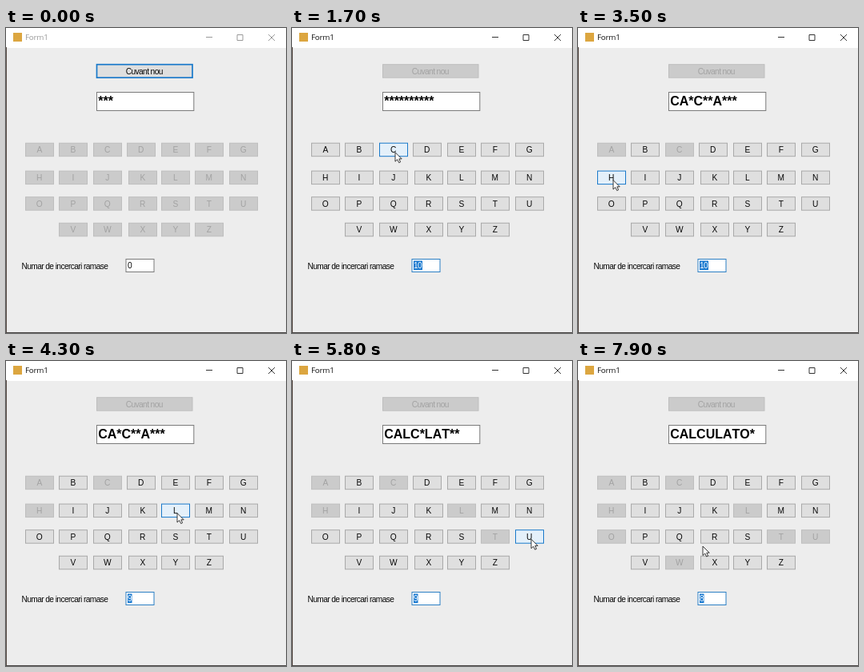
These frames come from a looping animation (350x382 px, 8 s). An HTML page:

```html
<!DOCTYPE html>
<html lang="ro">
<head>
<meta charset="utf-8">
<title>Form1</title>
<style>
html, body { margin: 0; width: 100%; height: 100%; overflow: hidden; background: #ededed; }
svg { display: block; width: 350px; height: 382px; }
text { font-family: "Liberation Sans", Arial, sans-serif; font-size: 10.2px; letter-spacing: -.6px; font-kerning: none; }
#title { font-family: "Open Sans", "Noto Sans", sans-serif; font-size: 9.8px; letter-spacing: -.2px; }
#word { font-size: 16px; font-weight: bold; letter-spacing: 0; }
</style>
</head>
<body>
<svg id="stage" viewBox="0 0 350 382"></svg>
<script>
const LOOP = 8000, STEP = 100, START = 1100;
const SECRET = 'CALCULATOR';
const guesses = { C: 1900, A: 2800, H: 3700, L: 4600, T: 5300, U: 6000, W: 6700, O: 7500 };

const stage = document.getElementById('stage');

function set(node, attrs) {
  for (const key in attrs) node.setAttribute(key, attrs[key]);
}
function add(tag, attrs, content) {
  const node = document.createElementNS('http://www.w3.org/2000/svg', tag);
  set(node, attrs);
  if (content) node.textContent = content;
  return stage.appendChild(node);
}
function box(x, y, width, height, fill, stroke) {
  return add('rect', { x: x + .5, y: y + .5, width: width - 1, height: height - 1, fill, stroke });
}
function makeButton(name, x, y, w) {
  const h = 17.5;
  return {
    name, x, y, w, h,
    face: box(x, y, w, h),
    text: add('text', { x: x + w / 2 - .5, y: y + 12.5, 'text-anchor': 'middle' }, name)
  };
}
function paintButton({ face, text }, enabled, hover, focused) {
  set(face, {
    fill: !enabled ? '#cbcbcb' : hover ? '#e4f0fa' : '#dfdfdf',
    stroke: !enabled ? '#bebebe' : hover || focused ? '#1979ca' : '#a9a9a9',
    'stroke-width': focused && !hover ? 1.7 : 1
  });
  text.setAttribute('fill', enabled ? '#080808' : '#a2a2a2');
}
function isOver(button, point) {
  return point && point.x >= button.x && point.x < button.x + button.w &&
    point.y >= button.y && point.y < button.y + button.h;
}

// Window
add('rect', { width: 350, height: 382, fill: '#ededed' });
add('rect', { width: 350, height: 25, fill: '#fff' });
add('rect', { y: 24, width: 1, height: 358, fill: '#594c46' });
add('rect', { y: 381, width: 350, height: 1, fill: '#4a4644' });
add('rect', { x: 9, y: 6, width: 11, height: 11, fill: '#dca640' });
const title = add('text', { id: 'title', x: 24, y: 15 }, 'Form1');
const controls = add('path', {
  d: 'M250 11.5h8M289 8.5h7v7h-7zM328 8l8 8M336 8l-8 8', fill: 'none'
});

// Form
const newWord = makeButton('Cuvant nou', 113, 45.2, 120.5);
const letters = ['ABCDEFG', 'HIJKLMN', 'OPQRSTU', ' VWXYZ'].flatMap((row, r) =>
  [...row].map((name, i) => name !== ' ' && makeButton(
    name,
    Math.floor(24 + 42.5 * i) + (r && i === 3 ? 2 : 0),
    r ? 146 + 32.6 * r : 143.7,
    36
  )).filter(Boolean));

box(113, 80, 122.3, 24, '#fff', '#7a7a7a');
const word = add('text', { id: 'word', x: 115.2, y: 97.3, fill: '#000' });
add('text', { x: 19.5, y: 301.5, fill: '#080808' }, 'Numar de incercari ramase');
const countBox = box(149.5, 289, 36, 17, '#fff', '#7a7a7a');
const selection = add('rect', { x: 152, y: 291.5, height: 11.5, fill: '#1878cf' });
const count = add('text', { x: 152, y: 301.2 });
const pointer = add('path', {
  d: 'M0 0V11.5L2.7 9L4.7 13L6.6 12.1L4.8 8.2H8.2Z',
  fill: '#fff', stroke: '#222', 'stroke-width': .9
});

// The pointer rests on each key around its click and wanders in between.
const stop = (time, x, y) => ({ time, x, y });
const visits = Object.entries(guesses).flatMap(([name, time]) => {
  const key = letters.find(button => button.name === name);
  const rest = dt => stop(time + dt, key.x + 20, key.y + 12);
  return [rest(-300), rest(50)];
});
const path = [
  stop(400, 345, 380), stop(900, 154, 53), stop(1200, 154, 53),
  ...visits,
  stop(4950, 213, 229), stop(6800, 148, 240), stop(7900, 156, 232)
].sort((a, b) => a.time - b.time);

function pointerAt(t) {
  const next = path.findIndex(p => p.time > t);
  if (next === 0) return null;
  if (next < 0) return path.at(-1);
  const from = path[next - 1], to = path[next];
  const k = (t - from.time) / (to.time - from.time);
  const ease = k * k * (3 - 2 * k);
  return { x: from.x + (to.x - from.x) * ease, y: from.y + (to.y - from.y) * ease };
}

function draw(t) {
  const active = t >= 800, playing = t >= START;
  const used = Object.keys(guesses).filter(letter => t >= guesses[letter]);
  const misses = used.filter(letter => !SECRET.includes(letter)).length;
  const left = playing ? 10 - misses : 0;
  const point = pointerAt(t);

  title.setAttribute('fill', active ? '#111' : '#999');
  controls.setAttribute('stroke', active ? '#333' : '#999');
  paintButton(newWord, !playing, isOver(newWord, point), !playing);
  for (const button of letters) {
    const ready = playing || (t >= START - STEP && button.name <= 'N');
    const enabled = ready && !used.includes(button.name);
    paintButton(button, enabled, isOver(button, point), false);
  }

  word.textContent = playing
    ? [...SECRET].map(c => used.includes(c) ? c : '*').join('') : '***';
  count.textContent = left;
  count.setAttribute('fill', playing ? '#fff' : '#080808');
  countBox.setAttribute('stroke', playing ? '#2b7fc4' : '#7a7a7a');
  selection.setAttribute('width', playing ? 5.5 * String(left).length : 0);

  pointer.setAttribute('visibility', point ? 'visible' : 'hidden');
  if (point) pointer.setAttribute('transform', `translate(${point.x} ${point.y})`);
}

const started = performance.now();
function tick() {
  const t = (performance.now() - started) % LOOP;
  draw(Math.floor(t / STEP) * STEP);
  requestAnimationFrame(tick);
}
tick();
</script>
</body>
</html>
```
